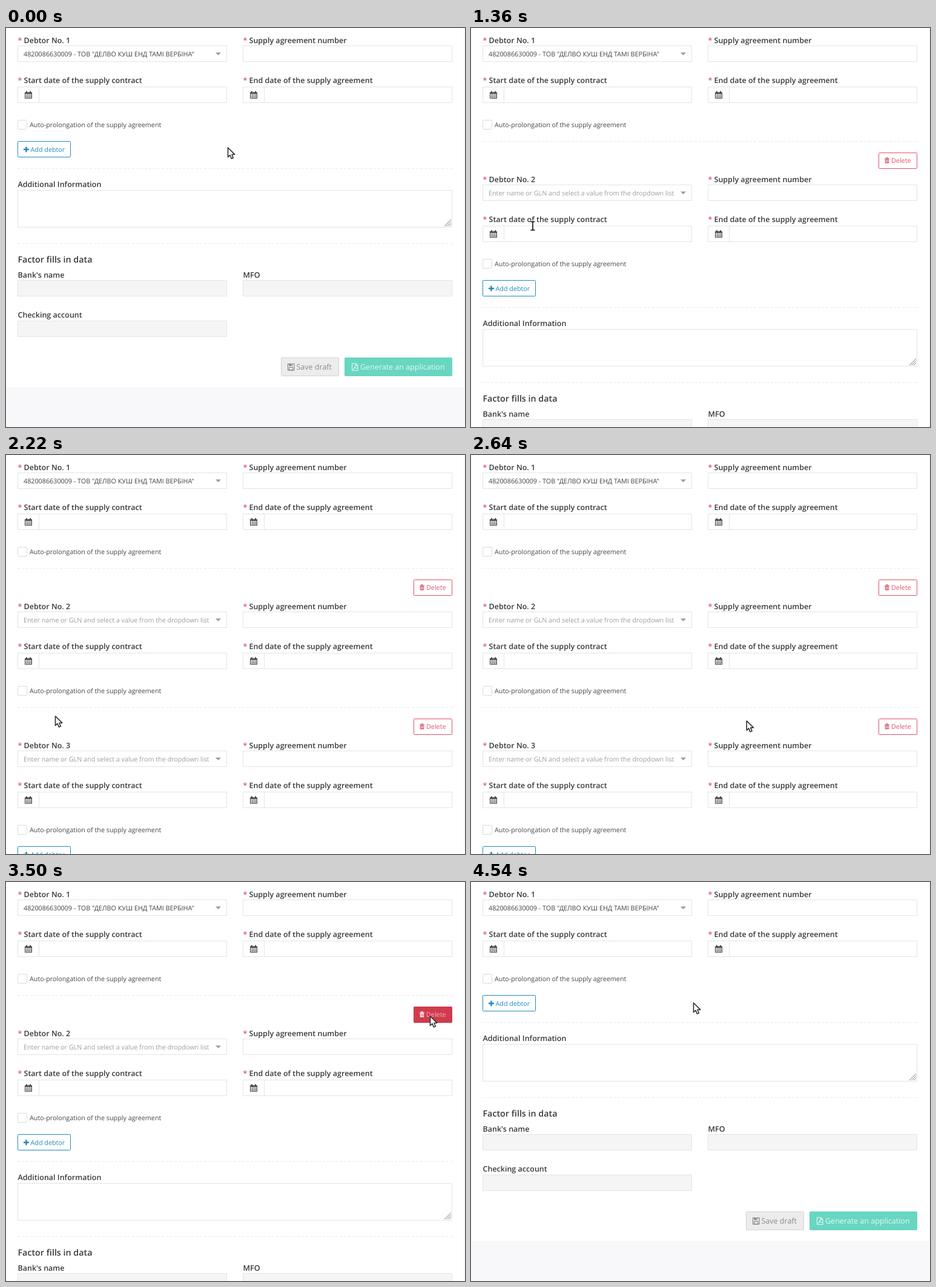
Write an HTML page with a canvas that moves like this. It is 758 by 660 pixels and loops after 4.66 s.

```html
<!DOCTYPE html>
<html lang="en">
<head>
<meta charset="utf-8">
<title>Debtor form</title>
<style>
  html, body { margin: 0; width: 100%; height: 100%; overflow: hidden; background: #f8f8fb; }
  canvas { display: block; }
</style>
</head>
<body>
<canvas id="stage" width="758" height="660"></canvas>
<script>
const ctx = document.getElementById('stage').getContext('2d');
const LOOP = 4660;
const BLOCK = 230.2;          // height of one debtor section
const HOVER_LAG = 40;
const SMALL = 10.77, NORMAL = 12.52, LARGE = 14.3;
const INK = '#36393d', LINE = '#e2e4e6', RED = '#df5468', BLUE = '#2489c0', HOT = '#d03b4e';

// Pointer keys: time, x, y
const PATH = [
  [0, 366, 197], [180, 366, 197], [700, 104, 199], [850, 84, 203], [1080, 84, 203],
  [1360, 102, 327], [1640, 81, 431], [2220, 81, 431], [2960, 701, 444], [3120, 701, 444],
  [3280, 701, 327], [3440, 700, 221], [3680, 700, 221], [3900, 650, 209],
  [4370, 367, 199], [LOOP, 367, 199]
];
// Number of extra debtors from each moment on
const COUNTS = [[0, 0], [960, 1], [1860, 2], [3100, 1], [3600, 0]];

// Monotone cubic through the keys, at rest wherever two keys agree
function track(t, axis) {
  let i = 0;
  while (i < PATH.length - 2 && t >= PATH[i + 1][0]) i++;
  const secant = k => PATH[k] && PATH[k + 1]
    ? (PATH[k + 1][axis] - PATH[k][axis]) / (PATH[k + 1][0] - PATH[k][0]) : 0;
  const tangent = k => {
    const a = secant(k - 1), b = secant(k);
    return a * b > 0 ? 2 * a * b / (a + b) : 0;
  };
  const [p, q] = [PATH[i], PATH[i + 1]];
  const h = q[0] - p[0], u = (t - p[0]) / h, v = 1 - u;
  return p[axis] * (1 + 2 * u) * v * v + tangent(i) * h * u * v * v
       + q[axis] * u * u * (3 - 2 * u) - tangent(i + 1) * h * u * u * v;
}
const pointerAt = t => ({ x: track(t, 1), y: track(t, 2) });
const inside = (p, x, y, w, h) => p.x >= x && p.x <= x + w && p.y >= y && p.y <= y + h;
const offset = n => Math.round(BLOCK * n);

function text(str, x, y, size = NORMAL, color = INK, weight = 400) {
  ctx.font = `${weight} ${size}px "Open Sans", sans-serif`;
  ctx.fillStyle = color;
  ctx.fillText(str, x, y);
}
function label(str, x, y, required) {
  if (required) text('*', x, y, NORMAL, RED, 600);
  text(str, required ? x + 10 : x, y, NORMAL, INK, 600);
}
function box(x, y, w, h, fill = '#fff', line = LINE, radius = 0) {
  ctx.beginPath();
  ctx.roundRect(x + .5, y + .5, w - 1, h - 1, radius);
  ctx.fillStyle = fill;
  ctx.fill();
  ctx.strokeStyle = line;
  ctx.lineWidth = 1;
  ctx.stroke();
}
function rect(x, y, w, h, color) {
  ctx.fillStyle = color;
  ctx.fillRect(x, y, w, h);
}
function poly(points, color) {
  ctx.beginPath();
  points.forEach(p => ctx.lineTo(...p));
  ctx.closePath();
  ctx.fillStyle = color;
  ctx.fill();
}
function separator(y) {
  ctx.setLineDash([4, 3]);
  ctx.strokeStyle = '#e7eaec';
  ctx.lineWidth = 1;
  ctx.beginPath();
  ctx.moveTo(19, y + .5);
  ctx.lineTo(737, y + .5);
  ctx.stroke();
  ctx.setLineDash([]);
}

function calendar(x, y) {
  rect(x, y + 1.8, 12, 10.4, '#444');
  rect(x + 2, y, 2, 3, '#444');
  rect(x + 8, y, 2, 3, '#444');
  for (let r = 0; r < 3; r++)
    for (let c = 0; c < 4; c++) rect(x + 1 + c * 2.6, y + 4.4 + r * 2.4, 2, 1.8, '#fff');
}
function trash(x, y, color, back) {
  rect(x, y + 1.5, 8, 1.1, color);
  rect(x + 2.5, y, 3, 1.5, color);
  rect(x + .8, y + 3, 6.4, 6.6, color);
  for (let i = 0; i < 3; i++) rect(x + 1.9 + i * 1.8, y + 4, .8, 4.2, back);
}
function floppy(x, y, color) {
  ctx.strokeStyle = color;
  ctx.lineWidth = 1.1;
  ctx.strokeRect(x + .5, y + .5, 10.5, 10.5);
  ctx.strokeRect(x + 2.7, y + 6.5, 6, 4.5);
  rect(x + 2.4, y + .5, 5.8, 3.8, color);
  rect(x + 5.8, y + 1.2, 1.4, 2.2, '#ececec');
}
function documentIcon(x, y, color) {
  ctx.strokeStyle = color;
  ctx.lineWidth = 1.1;
  ctx.beginPath();
  [[.5, .5], [6.5, .5], [10, 4], [10, 12], [.5, 12]].forEach(([a, b]) => ctx.lineTo(x + a, y + b));
  ctx.closePath();
  ctx.moveTo(x + 6.5, y + .5);
  ctx.lineTo(x + 6.5, y + 4);
  ctx.lineTo(x + 10, y + 4);
  ctx.moveTo(x + 2.2, y + 10.5);
  ctx.quadraticCurveTo(x + 5.2, y + 8, x + 4.7, y + 4.8);
  ctx.quadraticCurveTo(x + 5.4, y + 8.2, x + 8.6, y + 8.7);
  ctx.stroke();
}

function dateField(x, y, w) {
  box(x, y, w, 27);
  rect(x + 35, y, 1, 27, LINE);
  calendar(x + 12, y + 7.5);
}
function debtor(index, hover) {
  const dy = offset(index);
  if (index) {
    const y = offset(index - 1);
    separator(y + 187);
    const hot = inside(hover, 673, y + 206, 64, 27);
    const back = hot ? HOT : '#fff';
    box(673, y + 206, 64, 27, back, hot ? HOT : RED, 1);
    trash(683, y + 214, hot ? '#fff' : RED, back);
    text('Delete', 694, y + 223, SMALL, hot ? '#f0b0b8' : RED);
  }
  label(`Debtor No. ${index + 1}`, 19.5, dy + 24.5, true);
  box(19, dy + 29, 346, 27);
  if (index) text('Enter name or GLN and select a value from the dropdown list', 29, dy + 46.5, SMALL, '#9e9e9e');
  else text('4820086630009 - ТОВ "ДЕЛВО КУШ ЕНД ТАМІ ВЕРБІНА"', 29, dy + 46.7, SMALL, '#424242');
  poly([[346, dy + 40.5], [355, dy + 40.5], [350.5, dy + 45]], '#999');
  label('Supply agreement number', 391.5, dy + 24.5, true);
  box(391, dy + 29, 346, 27);
  label('Start date of the supply contract', 19.5, dy + 90.7, true);
  label('End date of the supply agreement', 391.5, dy + 90.7, true);
  dateField(19, dy + 97, 346);
  dateField(391, dy + 97, 346);
  box(19, dy + 152, 16, 16, '#fff', '#d9dbdd', 1);
  text('Auto-prolongation of the supply agreement', 39, dy + 163.8, SMALL, '#44474b');
}

function footer(dy, hover) {
  const hot = inside(hover, 19, dy + 187, 88, 27);
  const front = hot ? '#fff' : BLUE;
  box(19, dy + 187, 88, 27, hot ? BLUE : '#fff', BLUE, 1);
  rect(29, dy + 199.6, 9, 2.5, front);
  rect(32.2, dy + 196.4, 2.5, 9, front);
  text('Add debtor', 40.5, dy + 204.8, SMALL, front);
  separator(dy + 232);

  label('Additional Information', 19.5, dy + 263.2);
  box(19, dy + 268, 718, 62);
  ctx.strokeStyle = '#777';
  ctx.beginPath();
  for (const s of [11, 7.5, 4]) {
    ctx.moveTo(735 - s, dy + 328);
    ctx.lineTo(735, dy + 328 - s);
  }
  ctx.stroke();
  separator(dy + 356);

  text('Factor fills in data', 19.5, dy + 388, LARGE, INK, 600);
  label("Bank's name", 19.5, dy + 413);
  label('MFO', 391.5, dy + 413);
  label('Checking account', 19.5, dy + 479);
  for (const [x, y] of [[19, 417], [391, 417], [19, 484]]) box(x, dy + y, 346, 27, '#f5f5f5');

  box(454, dy + 545, 96, 31, '#ececec', '#d3d3d3', 1);
  floppy(465, dy + 555, '#858585');
  text('Save draft', 479.5, dy + 565, NORMAL, '#8a8a8a');
  box(559, dy + 545, 178, 31, '#68d6c1', '#68d6c1', 1);
  documentIcon(571, dy + 554.5, '#e6f9f5');
  text('Generate an application', 585, dy + 565, NORMAL, '#e6f9f5');
}

function overText(p, count) {
  for (let i = 0; i <= count; i++) {
    const dy = offset(i);
    if (inside(p, 391, dy + 29, 346, 27) || inside(p, 426, dy + 97, 311, 27)
      || inside(p, 55, dy + 97, 310, 27) || inside(p, 19, dy + 80, 206, 14)
      || inside(p, 19, dy + 14, 87, 13)) return true;
  }
  return false;
}
function pointer({ x, y }, beam) {
  ctx.save();
  ctx.translate(x, y);
  ctx.lineJoin = 'round';
  ctx.beginPath();
  if (beam) {
    for (const s of [-1, 1]) {
      ctx.moveTo(-3.5, s * 7);
      ctx.lineTo(3.5, s * 7);
    }
    ctx.moveTo(0, -7);
    ctx.lineTo(0, 7);
    ctx.strokeStyle = '#fff';
    ctx.lineWidth = 4;
    ctx.stroke();
    ctx.strokeStyle = '#222';
    ctx.lineWidth = 1.8;
    ctx.stroke();
  } else {
    [[.5, 1], [.5, 16.5], [4, 13.3], [6.3, 19], [9.3, 17.8], [7, 12.3], [11.8, 12.1]]
      .forEach(p => ctx.lineTo(...p));
    ctx.closePath();
    ctx.fillStyle = '#fff';
    ctx.fill();
    ctx.strokeStyle = '#2e2e34';
    ctx.lineWidth = 1.6;
    ctx.stroke();
  }
  ctx.restore();
}

function draw(now) {
  const t = now % LOOP;
  const count = COUNTS.filter(([start]) => t >= start).pop()[1];
  const mouse = pointerAt(t);
  const hover = pointerAt(Math.max(0, t - HOVER_LAG));
  const dy = offset(count);

  ctx.textRendering = 'geometricPrecision';
  rect(0, 0, 758, 660, '#f8f8fb');
  rect(1, 0, 755, dy + 594, '#fff');
  for (let i = 0; i <= count; i++) debtor(i, hover);
  footer(dy, hover);
  pointer(mouse, overText(mouse, count));
  requestAnimationFrame(draw);
}
requestAnimationFrame(draw);
</script>
</body>
</html>
```
